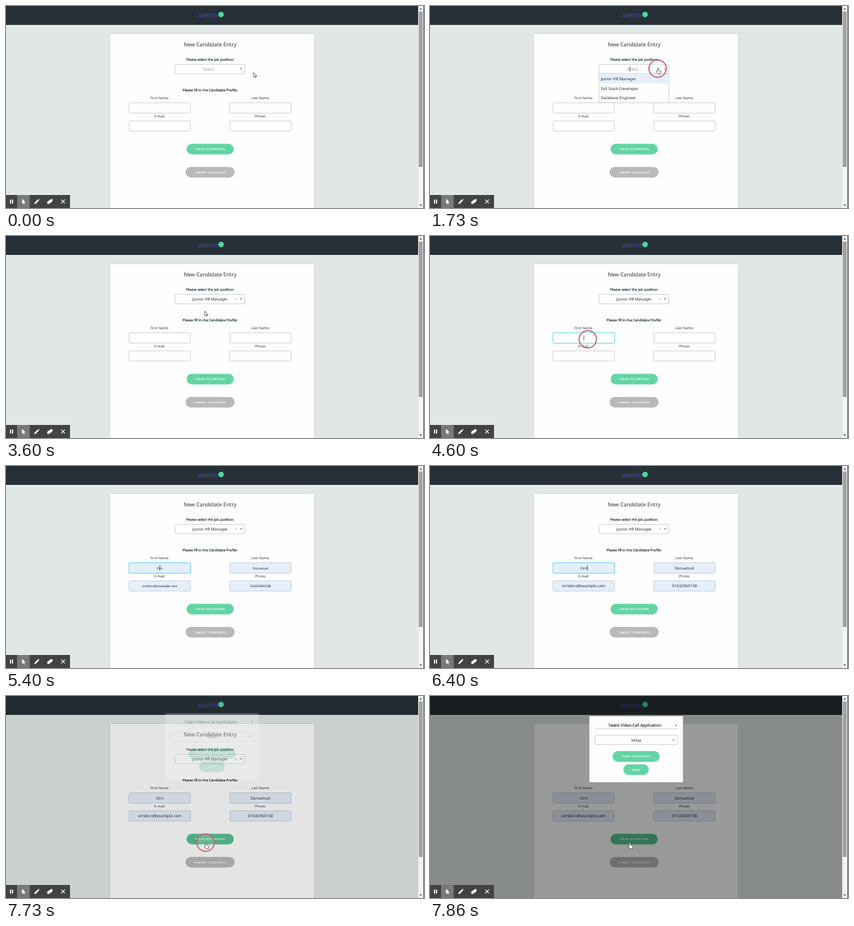
Recreate the animation shown at these times as an HTML page. Size 640x310 px, loop 8000 ms.

```html
<!DOCTYPE html>
<html lang="en">
<head>
<meta charset="utf-8">
<title>Candidate entry</title>
<style>
  html, body { margin: 0; width: 100%; height: 100%; overflow: hidden; background: #e1e7e4; }
  svg { display: block; width: 100%; height: 100%; }
  text {
    font: 6.1px "Noto Sans", "Open Sans", sans-serif;
    fill: #2b2f33; text-anchor: middle; text-rendering: geometricPrecision;
  }
  .title { font-size: 8.2px; }
  .label { font-size: 5.3px; fill: #2c3a48; }
  .strong { stroke: #2c3a48; stroke-width: .2; }
  .hint { fill: #999; }
  .left text { text-anchor: start; }
  .caps { font-size: 4.1px; font-weight: 700; letter-spacing: .5px; fill: #f4fbf8; }
  .preview { font: 5.2px "Liberation Sans", Arial, sans-serif; }
  .logo { font-size: 12px; font-weight: 300; fill: #4148a6; }
  .box { fill: #fdfefd; stroke: #c3c8c8; stroke-width: .8; }
  .mint { fill: #64d4a4; }
  .caret { stroke: #222; stroke-width: .7; }
  .mark { fill: #8f9494; }
  .cursor { fill: #fff; stroke: #333; stroke-width: .7; stroke-linejoin: round; }
</style>
</head>
<body>
<svg viewBox="0 0 640 310" preserveAspectRatio="none">
  <rect width="640" height="310" fill="#e1e7e4"/>
  <rect width="631" height="29" fill="#263036"/>
  <text class="logo" x="309.5" y="18">welm</text>
  <circle cx="329.3" cy="13" r="4.3" fill="#4fd3a4"/>

  <rect x="159" y="42.5" width="313" height="275" rx="1" fill="#fdfefd" stroke="#d0d7d4" stroke-width=".8"/>
  <text class="title" x="312.5" y="61.7">New Candidate Entry</text>
  <text class="label strong" x="312.5" y="83.8">Please select the job position:</text>
  <text class="label strong" x="312.5" y="131.3">Please fill in the Candidate Profile:</text>

  <rect class="box" x="258.8" y="89.6" width="106.8" height="14.4" rx="1.5"/>
  <text id="hint" class="hint" x="312.3" y="99.1">Select...</text>
  <g id="chosen">
    <text x="312.5" y="99.1">Junior HR Manager</text>
    <text class="hint" x="352" y="98.9">×</text>
  </g>
  <path id="arrow" class="mark" d="M-2.1-1.1H2.1L0 1.2Z"/>

  <g id="fields"></g>

  <rect id="video" x="276.5" y="211.5" width="72.2" height="16.2" rx="8.1"/>
  <text class="caps" x="312.7" y="221">VIDEO RECORDING</text>
  <rect x="275" y="247" width="75" height="16.2" rx="8.1" fill="#b9b9b9"/>
  <text class="caps" x="312.7" y="256.6">SUBMIT CANDIDATE</text>

  <g id="list" class="left">
    <rect class="box" x="258.8" y="104" width="107" height="44.6"/>
    <rect x="259.2" y="104.3" width="106.2" height="14.4" fill="#e5f0fa"/>
    <text x="261.4" y="113.5">Junior HR Manager</text>
    <text x="261.4" y="128.5">Full Stack Developer</text>
    <text x="261.4" y="143.2">Database Engineer</text>
  </g>
  <path id="listCaret" class="caret" d="M306 93V100.5"/>
  <path id="nameCaret" class="caret" d="M0 152.3V160.3"/>

  <rect id="shade" width="631.5" height="310"/>
  <g id="modal">
    <rect x="244" y="31" width="143.3" height="101.3" fill="#fefefe"/>
    <text class="strong" x="313.7" y="46.8" style="fill:#2c3a48">Select Video-Call Application</text>
    <text x="377" y="46.5">×</text>
    <path d="M253 50.3H379" stroke="#c9cdcd" stroke-width=".7"/>
    <rect class="box" x="252.7" y="60.2" width="126.3" height="14.4" rx="1.5"/>
    <text x="315.7" y="69.7">Velqa</text>
    <path class="mark" d="M-2.1-1.1H2.1L0 1.2Z" transform="translate(372.8 67.6)"/>
    <rect class="mint" x="279.6" y="84.5" width="72" height="16.4" rx="8.2"/>
    <text class="caps" x="315.8" y="94.2">START RECORDING</text>
    <rect class="mint" x="296" y="105" width="39" height="16.2" rx="8.1"/>
    <text class="caps" x="315.8" y="114.6">BACK</text>
  </g>

  <rect x="631.3" width="8.7" height="310" fill="#f3f3f3"/>
  <rect x="632" y="8.5" width="6" height="238.5" fill="#a3a3a3"/>
  <path d="M633 5.5L635 3L637 5.5ZM633 304.5L635 307L637 304.5Z" fill="#505050"/>
  <rect x="639.2" width=".8" height="310" fill="#333"/>

  <rect y="290" width="98" height="20" fill="#414344"/>
  <rect x="17" y="290" width="19.3" height="20" fill="#77797a"/>
  <g fill="#fff">
    <path d="M6 297H7.7V303.2H6ZM9.2 297H10.9V303.2H9.2Z"/>
    <path d="M24.6 295.8V303.4L26.3 302L27.3 304.4L28.6 303.8L27.6 301.5H30Z"/>
    <path d="M43.3 304L43.8 301.8L48.6 297L50.4 298.8L45.6 303.6ZM49.2 296.4L49.8 295.8L51.6 297.6L51 298.2Z"/>
    <path d="M63.3 300.2L69.5 296L71.6 297.2L70.7 300.2L64.9 304.2L63.2 303.2Z"/>
    <path d="M84.6 297.2L90.2 302.8M90.2 297.2L84.6 302.8" stroke="#fff" stroke-width="1.1"/>
  </g>

  <circle id="ring" r="13.3" fill="#fff" fill-opacity=".15" stroke="#cc6270" stroke-width="2" opacity=".9"/>
  <g id="cursor" class="cursor">
    <path id="pointer" d="M0 0V7.2L1.7 5.7L2.8 8.1L3.9 7.6L2.8 5.3H5Z"/>
    <path id="hand" d="M-1 1.2Q-1 0 0 0T1 1.2V3.8L3.6 4.3Q4.7 4.6 4.5 5.8L3.8 9.3H0L-2.4 6Q-2.6 4.7-1 5.5Z"/>
  </g>
</svg>
<script>
const LOOP = 8000;
const OPEN = 1730, PICK = 3330, FOCUS = 4600, PREVIEW = 5400, FILL = 6365, BLUR = 7600, MODAL = 7690;
const $ = id => document.getElementById(id);
const show = (id, on) => $(id).setAttribute('visibility', on ? 'visible' : 'hidden');
const move = (id, x, y) => $(id).setAttribute('transform', `translate(${x} ${y})`);
const clamp = v => Math.min(1, Math.max(0, v));
const inside = (x, y, l, t, r, b) => x > l && x < r && y > t && y < b;

const fields = [
  ['First Name:', 'Orn', 188.4, 148.6],
  ['Last Name:', 'Dorvamuti', 342.6, 148.6],
  ['E-mail:', 'orndorv@example.com', 188.4, 176.2],
  ['Phone:', '01632960158', 342.6, 176.2],
];
$('fields').innerHTML = fields.map(([label, value, x, y]) => `
  <text class="label" x="${x + 47}" y="${y - 5.4}">${label}</text>
  <rect class="box" x="${x}" y="${y}" width="94" height="15.8" rx="1.5"/>
  <text class="value" x="${x + 47}" y="${y + 9.9}">${value}</text>`).join('');
const boxes = [...$('fields').querySelectorAll('rect')];
const values = [...$('fields').querySelectorAll('.value')];

// Mouse path: time, x, y
const path = [
  [0, 379, 102], [660, 379, 102], [730, 377, 101], [1130, 377, 101], [1530, 349, 95],
  [1860, 349, 95], [2260, 342, 106], [2660, 342, 106], [2800, 334, 113], [3130, 312, 111],
  [3530, 312, 111], [4130, 247, 147], [6660, 258, 196], [7130, 306, 225], [LOOP, 306, 225],
];
// Clicks: time, x, y
const clicks = [[OPEN, 348.5, 96], [PICK, 312, 112], [FOCUS, 241.6, 158.5], [BLUR, 305.6, 225]];

function mouseAt(t) {
  const i = path.findIndex(p => p[0] > t);
  const [t0, x0, y0] = path[i - 1], [t1, x1, y1] = path[i];
  const k = (t - t0) / (t1 - t0);
  return [x0 + (x1 - x0) * k, y0 + (y1 - y0) * k];
}

const blink = (t, from) => t >= from && Math.floor((t - from) / 500) % 2 === 0;

function render(t) {
  const open = t >= OPEN && t < PICK;
  show('list', open);
  show('listCaret', open && blink(t, OPEN));
  show('hint', t < PICK);
  show('chosen', t >= PICK);
  $('arrow').setAttribute('transform', `translate(359.8 96.7) scale(1 ${open ? -1 : 1})`);

  const focused = t >= FOCUS && t < BLUR;
  const filled = t >= PREVIEW;
  boxes.forEach((box, i) => {
    const active = focused && i === 0;
    box.style.fill = filled ? '#e5eefb' : '';
    box.style.stroke = active ? '#62d3ea' : '';
    box.style.filter = active ? 'drop-shadow(0 0 .8px #8fe3f3)' : '';
  });
  values.forEach(value => {
    value.setAttribute('visibility', filled ? 'visible' : 'hidden');
    value.classList.toggle('preview', t < FILL);
  });
  const since = t >= FILL ? FILL + 35 : t >= PREVIEW ? PREVIEW + 30 : FOCUS;
  show('nameCaret', focused && blink(Math.max(t, since), since));
  move('nameCaret', t >= FILL ? 241 : 235.6, 0);

  const [x, y] = mouseAt(t);
  const onButton = inside(x, y, 276, 211, 349, 228);
  const hand = onButton || inside(x, y, 258, 89, 366, 104);
  const away = t >= 4130 && t < 6700;
  $('video').setAttribute('fill', onButton && !away ? '#57c092' : '#64d4a4');
  move('cursor', x, y);
  $('cursor').style.display = away ? 'none' : '';
  show('pointer', !hand);
  show('hand', hand);

  const click = clicks.find(c => t >= c[0] && t < c[0] + 200);
  show('ring', click);
  if (click) {
    move('ring', click[1], click[2]);
    $('ring').setAttribute('opacity', .9 * clamp((200 - t + click[0]) / 70));
  }

  const k = clamp((t - MODAL) / 160);
  $('shade').setAttribute('opacity', .4 * k);
  $('modal').setAttribute('opacity', k);
  move('modal', 0, -8 * (1 - k) ** 2);
}

const start = performance.now();
function tick() {
  render((performance.now() - start) % LOOP);
  requestAnimationFrame(tick);
}
tick();
</script>
</body>
</html>
```
